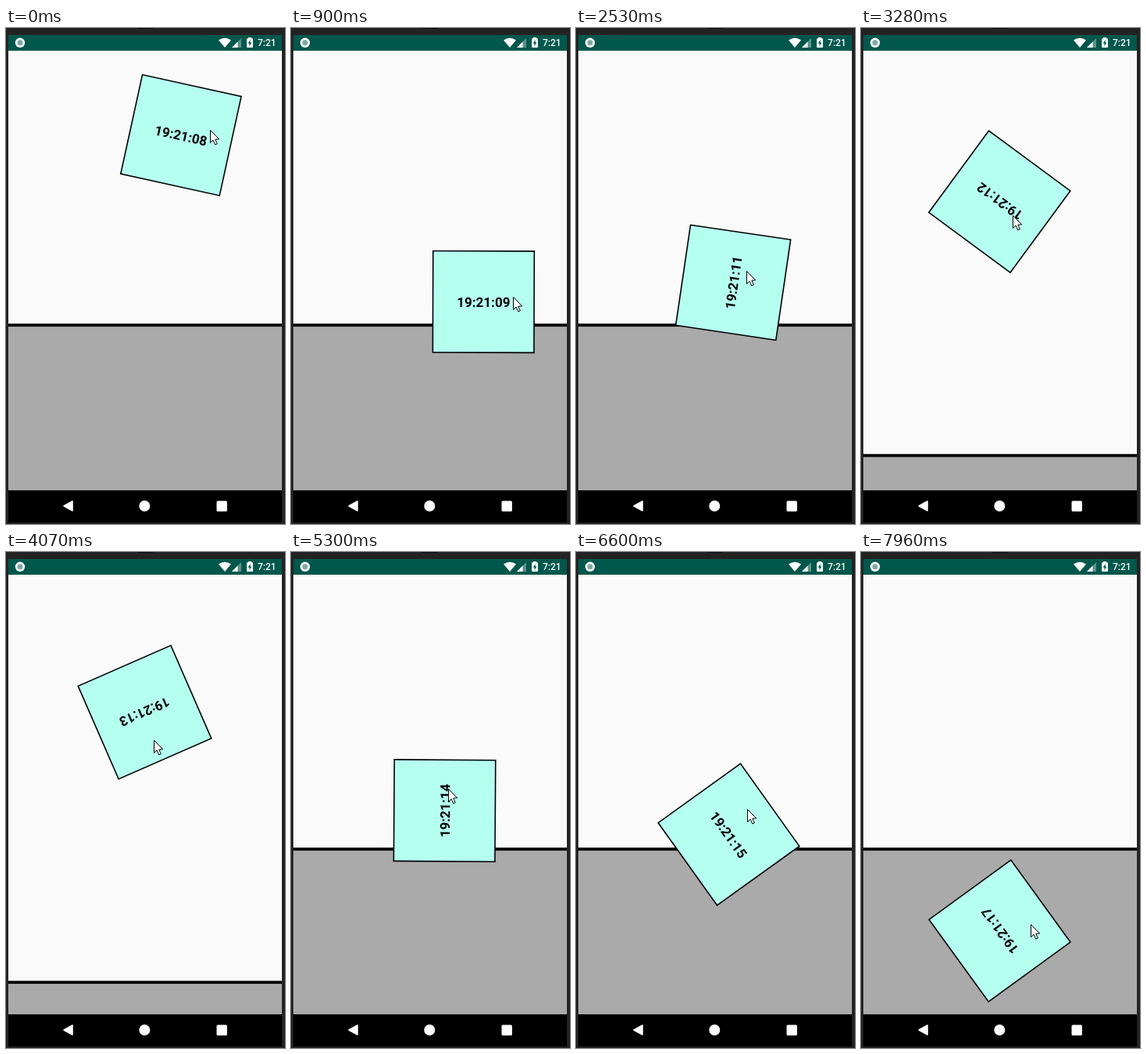
An HTML page with a canvas that plays this animation: 357x633 px, repeating every 8000 ms.

```html
<!DOCTYPE html>
<html lang="en">
<head>
<meta charset="utf-8">
<title>Spinning clock</title>
<style>
html, body { margin: 0; width: 100%; height: 100%; overflow: hidden; background: #232323; }
canvas { display: block; width: 357px; height: 633px; }
</style>
</head>
<body>
<canvas id="stage"></canvas>
<script>
const W = 357, H = 633, LOOP = 8000;
const LEFT = 3, WIDTH = 350, BAR_END = 29, NAV_TOP = 590;
const SPLIT = 379.2, SPLIT_TRAVEL = 170;
const SIDE = 129.5;
const SETTLE = 500, OPEN = 375, CLOSE = 300;
const TOP = { x: 177.5, y: 204.5 }, BOTTOM = { x: 177.5, y: 483.5 };

const canvas = document.getElementById('stage');
const ctx = canvas.getContext('2d');
const dpr = window.devicePixelRatio || 1;
canvas.width = W * dpr;
canvas.height = H * dpr;

// The spin wavers around 0.39 degrees per ms: time, angle
const SPIN = [[0, 12], [1770, 696], [3280, 1296], [4070, 1596], [5300, 2070], [6600, 2574], [7960, 3114]];

// Each drag carries the box along a path of [time, x, y]; on release it settles in a pane.
// The pointer holds the box by its grip, then wanders over the hover points.
const DRAGS = [
  { pane: BOTTOM, grip: [37.5, -6.5], hover: [[1770, 247, 319]],
    path: [[0, 223.8, 136.5], [400, 259, 235], [840, 245, 345], [1406, 257.5, 385.7]] },
  { pane: TOP, grip: [17, -15], hover: [[3280, 194, 239], [4070, 189, 240]],
    path: [[2150, BOTTOM.x, BOTTOM.y], [2500, 203, 325], [2955, 176, 322]] },
  { pane: TOP, grip: [4.5, -28], hover: [],
    path: [[4820, TOP.x, TOP.y], [5300, 196.6, 330.1], [5640, 195, 328]] },
  { pane: BOTTOM, grip: [23.5, -32.5], hover: [[7450, 219, 347], [7960, 217, 475]],
    path: [[6250, TOP.x, TOP.y], [6600, 195.5, 360.5], [7080, 197, 372]] }
];

const clamp = v => Math.min(1, Math.max(0, v));
const mix = (a, b, k) => a + (b - a) * k;
const easeOut = k => Math.sin(clamp(k) * Math.PI / 2);

function at(keys, t) {
  const i = keys.findIndex(key => key[0] > t);
  if (i < 0) return keys[keys.length - 1].slice(1);
  if (i === 0) return keys[0].slice(1);
  const a = keys[i - 1], b = keys[i];
  const k = (t - a[0]) / (b[0] - a[0]);
  return a.slice(1).map((v, j) => mix(v, b[j + 1], k));
}

const grabTime = drag => drag.path[0][0];
const held = (drag, [t, x, y]) => [t, x + drag.grip[0], y + drag.grip[1]];
const pointerPath = DRAGS.flatMap(d => [...d.path.map(p => held(d, p)), ...d.hover]);

function pose(t) {
  const i = DRAGS.findLastIndex(d => grabTime(d) <= t);
  const drag = DRAGS[i], before = DRAGS[i - 1];
  const drop = drag.path[drag.path.length - 1];
  let [x, y] = at(drag.path, t);
  let open = 0;
  if (t > drop[0]) {
    const k = easeOut((t - drop[0]) / SETTLE);
    x = mix(x, drag.pane.x, k);
    y = mix(y, drag.pane.y, k);
    if (drag.pane === TOP) open = easeOut((t - drop[0]) / OPEN);
  } else if (before && before.pane === TOP) {
    open = 1 - clamp((t - grabTime(drag)) / CLOSE);
  }
  return { x, y, split: SPLIT + SPLIT_TRAVEL * open };
}

function rect(color, x, y, w, h) {
  ctx.fillStyle = color;
  ctx.fillRect(x, y, w, h);
}

function roundRect(color, x, y, w, h, r) {
  ctx.fillStyle = color;
  ctx.beginPath();
  ctx.roundRect(x, y, w, h, r);
  ctx.fill();
}

function disc(color, x, y, r) {
  ctx.fillStyle = color;
  ctx.beginPath();
  ctx.arc(x, y, r, 0, Math.PI * 2);
  ctx.fill();
}

function shape(points, fill, stroke, width) {
  ctx.beginPath();
  points.forEach(([x, y]) => ctx.lineTo(x, y));
  ctx.closePath();
  ctx.fillStyle = fill;
  ctx.fill();
  if (!stroke) return;
  ctx.strokeStyle = stroke;
  ctx.lineWidth = width;
  ctx.lineJoin = 'round';
  ctx.stroke();
}

function label(text, x, y, font, color, align) {
  ctx.font = font;
  ctx.fillStyle = color;
  ctx.textAlign = align;
  ctx.fillText(text, x, y);
}

function statusBar() {
  const green = '#00574b';
  rect(green, LEFT, 9, WIDTH, BAR_END - 9);
  disc('#fff', 18, 18.8, 6.2);
  disc('#7fa8a1', 18, 18.8, 3.5);

  // wifi
  ctx.fillStyle = '#fff';
  ctx.beginPath();
  ctx.moveTo(280, 25);
  ctx.lineTo(272, 15.6);
  ctx.quadraticCurveTo(280, 10, 288, 15.6);
  ctx.fill();

  // signal
  shape([[301, 13], [301, 25], [289, 25]], '#5b918a');
  shape([[296.5, 17.5], [296.5, 25], [289, 25]], '#fff');

  // battery
  rect('#fff', 310, 12, 4, 2);
  roundRect('#fff', 308, 13.2, 8, 11.8, 1);
  shape([[312.6, 15], [309.8, 19.8], [311.5, 19.8], [311.5, 23.2], [314.3, 18.4], [312.6, 18.4]], green);

  label('7:21', 322, 23.2, '500 12px Roboto, sans-serif', '#fff', 'left');
}

function navBar() {
  rect('#000', LEFT, NAV_TOP, WIDTH, 631 - NAV_TOP);
  shape([[74, 610], [85, 604], [85, 616]], '#fff', '#fff', 1.6);
  disc('#fff', 177.3, 610, 7);
  roundRect('#fff', 269.5, 603.5, 13.4, 13.4, 1.5);
}

function panes(split) {
  rect('#fafafa', LEFT, BAR_END, WIDTH, split - BAR_END);
  rect('#aaaaaa', LEFT, split, WIDTH, NAV_TOP - split);
  rect('#000', LEFT, split - 1.9, WIDTH, 3.8);
}

function clockText(t) {
  const sec = 8 + Math.floor((t * 1.035 + 890) / 1000);
  return '19:21:' + String(sec).padStart(2, '0');
}

function clockBox(t, x, y) {
  const [deg] = at(SPIN, t);
  ctx.save();
  ctx.translate(x, y);
  ctx.rotate(deg * Math.PI / 180);
  rect('#b5fff1', -SIDE / 2, -SIDE / 2, SIDE, SIDE);
  ctx.strokeStyle = '#000';
  ctx.lineWidth = 1.6;
  ctx.lineJoin = 'miter';
  ctx.strokeRect(-SIDE / 2, -SIDE / 2, SIDE, SIDE);
  label(clockText(t), 0, 6.6, 'bold 17px Roboto, sans-serif', '#000', 'center');
  ctx.restore();
}

function pointer(t) {
  const [x, y] = at(pointerPath, t);
  ctx.save();
  ctx.translate(Math.round(x) + 0.5, Math.round(y) + 0.5);
  shape([[0, 0], [0, 16], [3.6, 12.6], [6.2, 18.4], [8.8, 17.3], [6.3, 11.6], [11.2, 11.4]], '#fff', '#000', 1);
  ctx.restore();
}

function draw(t) {
  const { x, y, split } = pose(t);
  ctx.setTransform(dpr, 0, 0, dpr, 0, 0);
  rect('#232323', 0, 0, W, H);
  rect('#000', 168, 0, 20, 0.7);
  panes(split);
  statusBar();
  clockBox(t, x, y);
  navBar();
  pointer(t);
}

const start = performance.now();
function loop() {
  draw(Math.max(0, performance.now() - start) % LOOP);
  requestAnimationFrame(loop);
}
loop();
</script>
</body>
</html>
```
